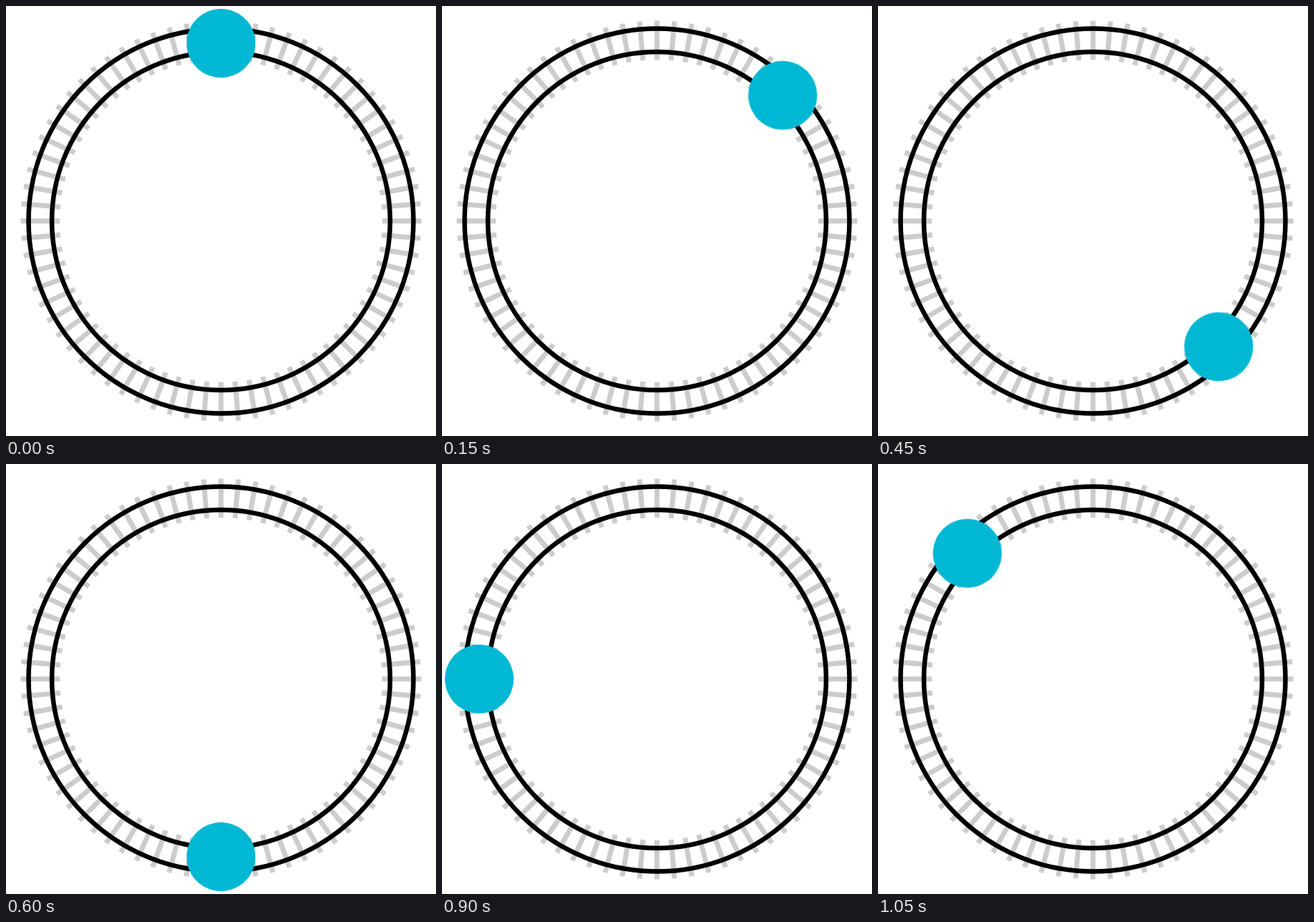
Write an HTML page that moves like this. It is 600x600 px and loops after 1.2 s.

```html
<!DOCTYPE html>
<html lang="en">
<head>
<meta charset="utf-8">
<title>Circular track</title>
<style>
  html, body { margin: 0; width: 100%; height: 100%; overflow: hidden; background: #fff; }
  svg { display: block; width: 100%; height: 100%; }
  #ties { stroke: #ccc; stroke-width: 7; }
  .rail { fill: none; stroke: #000; stroke-width: 6.5; }
  #ball { fill: #00b8d4; transform-origin: 0 0; }
</style>
</head>
<body>
<svg viewBox="-300 -300 600 600">
  <g id="ties"></g>
  <circle class="rail" r="268.5"/>
  <circle class="rail" r="236"/>
  <circle id="ball" cy="-248" r="48"/>
</svg>
<script>
  const TIES = 72, STOPS = 8, LOOP_MS = 1200;
  const ties = document.getElementById("ties");

  for (let i = 0; i < TIES; i++) {
    const tie = document.createElementNS(ties.namespaceURI, "line");
    tie.setAttribute("y1", -279.5);
    tie.setAttribute("y2", -225);
    tie.setAttribute("transform", `rotate(${i * 360 / TIES})`);
    ties.append(tie);
  }

  // The ball jumps clockwise from stop to stop.
  document.getElementById("ball").animate(
    { transform: ["rotate(0deg)", "rotate(360deg)"] },
    { duration: LOOP_MS, iterations: Infinity, easing: `steps(${STOPS}, end)` }
  );
</script>
</body>
</html>
```
